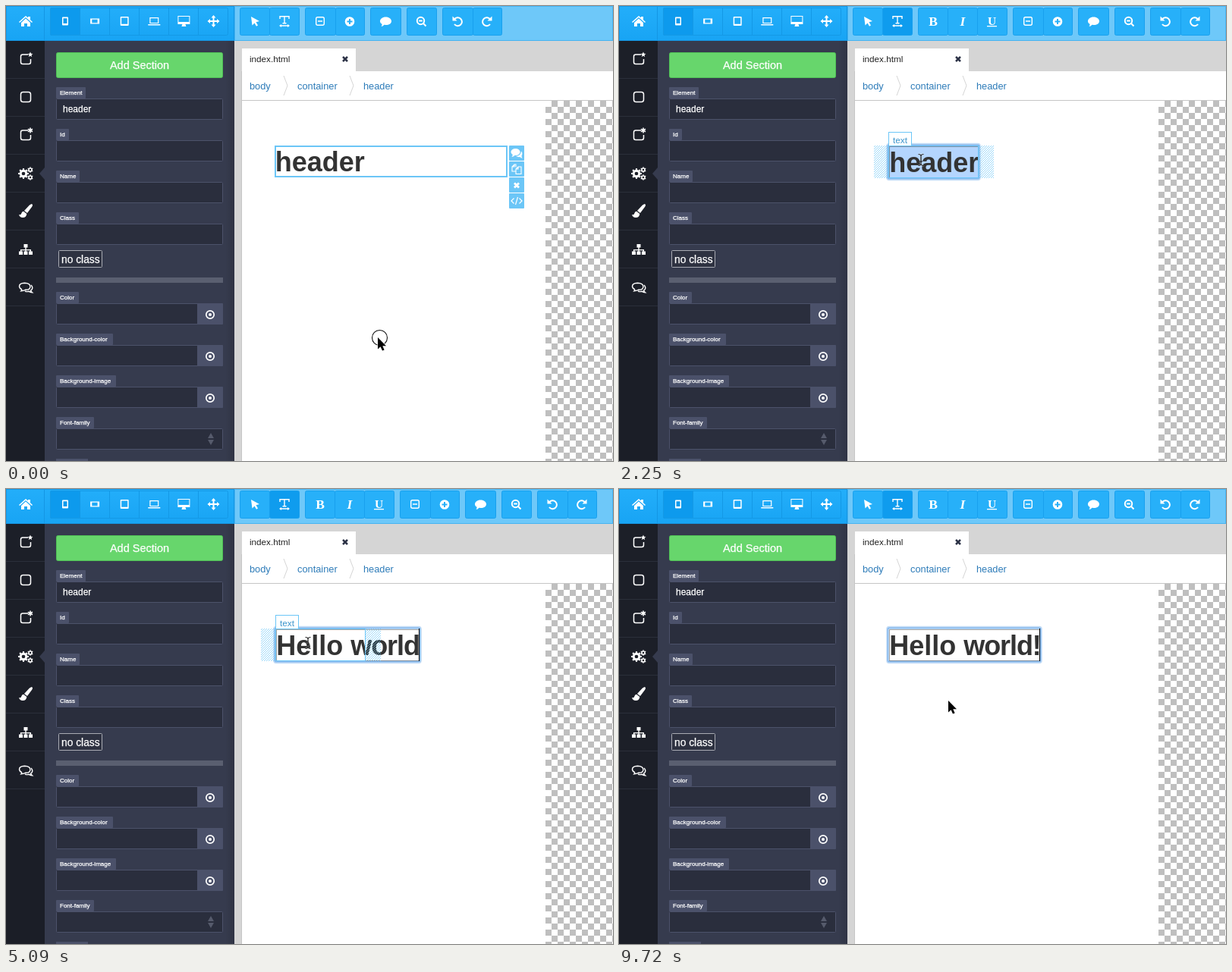
Recreate the animation shown at these times as an HTML page. Size 800 px wide and 600 px high, loop 9.86 s.

```html
<!DOCTYPE html>
<html lang="en">
<head>
<meta charset="utf-8">
<title>Page editor</title>
<style>
html, body { margin: 0; width: 100%; height: 100%; overflow: hidden; background: #fff; }
svg { display: block; width: 800px; height: 600px; }
text { font-family: "Liberation Sans", Arial, sans-serif; white-space: pre; }
.serif { font-family: "Liberation Serif", Times, serif; font-weight: bold; }
</style>
</head>
<body>
<svg id="stage" viewBox="0 0 800 600" xmlns="http://www.w3.org/2000/svg">
<defs>
  <pattern id="hatch" width="3" height="3" patternUnits="userSpaceOnUse">
    <path d="M-1 1L1-1M0 3L3 0M2 4L4 2" stroke="#6cc6f7" stroke-width=".7"/>
  </pattern>
  <pattern id="checker" x="711" y="125" width="16" height="16" patternUnits="userSpaceOnUse">
    <path d="M8 0h8v8H0v8h8z" fill="#bfbfbf"/>
  </pattern>
  <linearGradient id="bar" x2="0" y2="1"><stop stop-color="#23aefa"/><stop offset="1" stop-color="#18a4f4"/></linearGradient>
  <linearGradient id="edge"><stop stop-color="#000" stop-opacity="0"/><stop offset="1" stop-color="#000" stop-opacity=".12"/></linearGradient>
</defs>
<g id="base"></g>
<g id="tools"></g>
<g id="live"></g>
</svg>
<script>
const LOOP = 9860;
const SKY = '#6cc6f7';
const BAR = 46;
const byId = id => document.getElementById(id);

const rect = (x, y, w, h, fill, more = '') =>
  `<rect x="${x}" y="${y}" width="${w}" height="${h}" fill="${fill}" ${more}/>`;
const frame = (x, y, w, h, fill, stroke, r = 1) =>
  rect(x + .5, y + .5, w - 1, h - 1, fill, `stroke="${stroke}" rx="${r}"`);
const text = (x, y, s, size, fill = '#fff', more = '') =>
  `<text x="${x}" y="${y}" font-size="${size}" fill="${fill}" ${more}>${s}</text>`;
const solid = (x, y, d, fill = '#fff', more = '') =>
  `<path transform="translate(${x} ${y})" d="${d}" fill="${fill}" fill-rule="evenodd" ${more}/>`;
const line = (x, y, d, w = 1.5, color = '#fff', more = '') =>
  `<path transform="translate(${x} ${y})" d="${d}" fill="none" stroke="${color}" stroke-width="${w}" ${more}/>`;
const dot = (x, y, r, fill = '#fff', more = '') => `<circle cx="${x}" cy="${y}" r="${r}" fill="${fill}" ${more}/>`;
const STURDY = 'stroke="#fff" stroke-width=".25"';

const ICON = {
  home: 'M-9 0L0-8 3-5.400V-7H6V-2.700L9 0 8 1 0-6-8 1zM-6 1L0-4.500 6 1V6H2V2H-2V6H-6z',
  phone: 'M-3-5.500H3Q4-5.500 4-4.500V4.500Q4 5.500 3 5.500H-3Q-4 5.500-4 4.500V-4.500Q-4-5.500-3-5.500zM-2.500-3.800V3H2.500V-3.800z',
  wide: 'M-6-3.500H6V3.500H-6zM-3.800-2.200V2.200H3.500V-2.200z',
  tablet: 'M-4.500-6H4.500Q5.500-6 5.500-5V5Q5.500 6 4.500 6H-4.500Q-5.500 6-5.500 5V-5Q-5.500-6-4.500-6zM-4-4.500V3.800H4V-4.500z',
  laptop: 'M-6-5H6V3H-6zM-4.800-3.800V2H4.800V-3.800zM-8 4H8V5.500H-8z',
  desktop: 'M-8-7H8V4H2L3 7H-3L-2 4H-8zM-7-6V1H7V-6z',
  move: 'M0-8L3-4.500H1V-1H4.500V-3L8 0 4.500 3V1H1V4.500H3L0 8-3 4.500H-1V1H-4.500V3L-8 0-4.500-3V-1H-1V-4.500H-3z',
  pointer: 'M-5-6L6 0 1.500 1.300 4 5.500 2 6.700-.5 2.500-3.500 5.500z',
  bubble: 'M0-5.500C4.500-5.500 7.500-3 7.500 0S4.500 5 0 5L-2 4.800Q-4 7-6 7-4.500 5-5 3.800C-7 2.700-7.500 1.500-7.500 0-7.500-3-4.500-5.500 0-5.500z',
  undo: 'M-4-2.500A5.500 5.500 0 1 1-4 4',
  star: 'M0-3.500L1-1.200 3.500-1 1.500.6 2.200 3 0 1.700-2.200 3-1.500.6-3.500-1-1-1.200z',
  cross: 'M-3-3L3 3M3-3L-3 3',
  arrow: 'M0 0V15.500L3.600 12.200 6 17.600 8.600 16.500 6.300 11.300H11z',
  beam: 'M-3.500-7.500Q-1-7.500 0-6 1-7.500 3.500-7.500M0-6V6M-3.500 7.500Q-1 7.500 0 6 1 7.500 3.500 7.500M-2 2H2'
};

function group(x, widths, active = -1) {
  let out = '';
  widths.forEach((w, i) => {
    out += frame(x, 2, w + (i < widths.length - 1), 37, i === active ? '#0f9cee' : '#27b0f9', '#18a0ee', 2);
    x += w;
  });
  return out;
}

const speechOutline = (x, y) =>
  line(x, y, 'M-4.500 4.500Q-2 4.500-.5 3.300 6 3.500 6-1 5.500-5.500-1.500-5.700-8.500-5.500-8.500-1-8 1.500-5.500 2.500-5 3.500-6 4.700z', 1.400) +
  line(x, y, 'M7-3Q10 0 8 3L6.500 4Q7 5.500 8.500 6.700 5.500 6.500 4.500 5.300 1 6-1 5', 1.400);

const speechSolid = (x, y) =>
  `<ellipse cx="${x - 1.500}" cy="${y - 1.500}" rx="6" ry="4.500" fill="#fff"/>` +
  solid(x - 4.500, y + 2, 'M0-1L-2 3Q1 2.500 2.500 .5z') +
  solid(x + 2.500, y + 1.500, 'M3.500-4Q6-1.500 4 2 4 4 5 5 3 5 2 3.500-1 4-3.500 2.500 3 2 3.500-4z');

function gear(x, y, r, teeth) {
  const turn = 360 / teeth;
  let out = dot(x, y, r * .63, 'none', `stroke="#fff" stroke-width="${r * .48}"`);
  for (let i = 0; i < teeth; i++)
    out += rect(x - r * .18, y - r * 1.15, r * .36, r * .45, '#fff', `transform="rotate(${i * turn} ${x} ${y})"`);
  return out;
}

function topLeft() {
  let out = frame(0, 0, 301, BAR, 'url(#bar)', '#1595e2', 0) + rect(50, 0, 1, BAR, '#1496e4');
  out += rect(58, 2, 39, 37, '#0d9aed', 'rx="2"') + frame(58, 2, 235, 37, 'none', '#1499e6', 2);
  for (let x = 97; x < 290; x += 39) out += rect(x, 2, 1, 37, '#1499e6');
  out += solid(26, 21, ICON.home);
  ['phone', 'wide', 'tablet', 'laptop', 'desktop', 'move'].forEach((name, i) => {
    out += solid(78 + i * 39.1, 20, ICON[name]);
  });
  return out;
}

function sideNav() {
  let out = rect(0, BAR, 51, 600 - BAR, '#1b1e27') + rect(0, BAR, 51, 349, '#1c1f28');
  for (let y = 95; y < 400; y += 50) out += rect(0, y, 51, 1, '#2b2f3a');
  const open = 'M3-6H-4Q-6.500-6-6.500-3.500V4Q-6.500 6.500-4 6.500H4Q6.500 6.500 6.500 4V0';
  out += line(26, 70, open) + solid(32, 64, ICON.star);
  out += rect(19.500, 113.500, 13, 13, 'none', 'rx="3" stroke="#fff" stroke-width="1.500"');
  out += line(26, 170, open) + line(32, 164, 'M0-3.500V3.500M-3-1.700L3 1.700M3-1.700L-3 1.700', 1.600);
  out += gear(23, 221, 6, 8) + gear(32, 216, 3.300, 6) + gear(32, 226, 3.300, 6);
  out += solid(26, 270, 'M8-9Q10-8 8-5L2 3-2 0 5-7.500Q7-9 8-9zM-3 .7L1.300 4Q1 9-4 9-8 9-9 5-6 6-5.500 3-5 1-3 .7z');
  out += solid(26, 321, 'M-2.500-7H2.500V-2.500H.7V0H7V2.500H9V7H4V2.500H5.600V1.300H.7V2.500H2.500V7H-2.500V2.500H-.7V1.300H-5.600V2.500H-4V7H-9V2.500H-7V0H-.7V-2.500H-2.500z');
  return out + speechOutline(26, 371);
}

function field(y, name, tagWidth, picker) {
  let out = rect(66, y, tagWidth, 15, '#4b516a', 'rx="1"') + text(71, y + 10, name, 8, '#fff', STURDY) +
    frame(66, y + 15, 220, 28, '#2a2e3d', '#4c526a');
  if (picker) {
    out += rect(252, y + 15, 34, 28, '#4b516a', 'rx="1"') +
      dot(269, y + 30, 5.200, 'none', 'stroke="#fff" stroke-width="1.700"') + dot(269, y + 30, 2);
  }
  return out;
}

function panel() {
  let out = rect(51, BAR, 250, 600 - BAR, '#363b4e') + rect(289, BAR, 12, 600 - BAR, 'url(#edge)');
  out += solid(51, 221, 'M0-8L-7 0 0 8z', '#363b4e');
  out += frame(66, 61, 220, 34, '#67d66c', '#50c156', 2) +
    text(176, 83, 'Add Section', 14.500, '#fff', `text-anchor="middle" ${STURDY}`);
  [['Element', 39], ['Id', 17], ['Name', 31], ['Class', 30]].forEach(([name, w], i) => {
    out += field(107 + i * 55, name, w);
  });
  out += text(75, 140, 'header', 12, '#fff', STURDY);
  out += frame(69, 322, 58, 23, '#2e3241', '#a9abb3') + text(73, 339, 'no class', 13.800, '#fff', STURDY);
  out += rect(66, 358, 220, 7, '#5a5f70');
  [['Color', 30], ['Background-color', 75], ['Background-image', 79]].forEach(([name, w], i) => {
    out += field(377 + i * 55, name, w, true);
  });
  out += field(542, 'Font-family', 50) + solid(270, 571, 'M0-8L4-1H-4zM0 8L4 1H-4z', '#565b6c');
  return out + rect(66, 597, 42, 3, '#4b516a');
}

function workspace() {
  let out = rect(301, BAR, 499, 600 - BAR, '#d5d5d5') + rect(310, 86, 490, 514, '#c6c6c6');
  out += rect(311, 56, 150, 31, '#fff') + rect(311, 86, 489, 38, '#fff') + rect(311, 125, 489, 475, '#fff');
  out += rect(711, 125, 89, 475, 'url(#checker)');
  out += text(321, 74, 'index.html', 11.700, '#222') + line(447, 70, ICON.cross, 2.500, '#2d3347');
  [[321, 'body'], [384, 'container'], [471, 'header']].forEach(([x, s]) => {
    out += text(x, 110, s, 12.800, '#2e7cb9');
  });
  const chevron = 'M0-13L5 0 0 13';
  return out + line(366, 105, chevron, 1, '#d5d5d5') + line(453, 105, chevron, 1, '#d5d5d5');
}

function toolbar(textTool, formatting) {
  let out = frame(301, 0, 499, BAR, '#6ec8f9', '#45b4f2', 0);
  out += group(308, [39, 40], textTool ? 1 : -1) + solid(328, 20, ICON.pointer);
  out += line(367, 20, 'M-6-3V-6.200H6V-3M0-6V3M-2.500 2.700H2.500M-6 6H6', 1.400) +
    solid(367, 20, 'M-7 6L-4 4V8zM7 6L4 4V8z');
  if (formatting) {
    out += group(394, [39, 39, 40]);
    [['B', 414, ''], ['I', 453, 'font-style="italic"']].forEach(([s, x, style]) => {
      out += text(x, 26, s, 17.500, '#fff', `class="serif" text-anchor="middle" ${style}`);
    });
    out += text(491.500, 24.500, 'U', 15.500, '#fff', 'class="serif" text-anchor="middle"') + rect(485, 26, 13, 1.300, '#fff');
  }
  const redo = line(0, 0, ICON.undo, 2) + solid(0, 0, 'M-6.500-6.500V-.5H-.5z');
  const rest = group(394, [40, 39]) + group(480, [41]) + group(528, [40]) + group(575, [40, 39]) +
    rect(408.700, 14.700, 10.600, 10.600, 'none', 'rx="2" stroke="#fff" stroke-width="1.400"') +
    line(414, 20, 'M-3 0H3', 1.500) +
    dot(453, 20.500, 6.300) + line(453, 20.500, 'M-3.500 0H3.500M0-3.500V3.500', 2, '#27b0f9') +
    solid(500.500, 20, ICON.bubble) +
    dot(546.500, 19.500, 4.700, 'none', 'stroke="#fff" stroke-width="2"') +
    line(546.500, 19.500, 'M-2.300 0H2.300M3.500 3.500L7 7', 2) +
    `<g transform="translate(595 20)">${redo}</g><g transform="translate(634 20) scale(-1 1)">${redo}</g>`;
  return out + `<g transform="translate(${formatting ? 125 : 0})">${rest}</g>`;
}

const hatch = (x, y, w, h) => rect(x, y, w, h, 'url(#hatch)');
const tag = (s, w) => frame(355, 166, w, 19, '#fff', SKY, 0) + text(361, 181, s, 11.800, '#3a94cb');

function selectedHeader() {
  let out = text(354.800, 218, 'header', 36, '#333', 'font-weight="bold"') +
    rect(355, 185, 305, 40, 'none', `stroke="${SKY}" stroke-width="2"`);
  for (let i = 0; i < 4; i++) out += rect(663, 184 + i * 21, 20, 20, SKY, 'rx="1"');
  out += speechSolid(673, 194);
  out += line(673, 215, 'M-1-2.500V-6H-3L-6-3V3H-1M-3-6V-3H-6M-1 6.500V0L2-3H6V6.500zM2-3V0H-1', 1.100);
  out += line(673, 236.500, ICON.cross, 2.800);
  return out + line(673, 257, 'M-3.500-3.500L-7 0-3.500 3.500M3.500-3.500L7 0 3.500 3.500M1.500-5L-1.500 5', 1.200);
}

const hover = {
  header: () => hatch(355, 165, 305, 19) + hatch(355, 227, 305, 17) + tag('header', 48),
  container: () => hatch(340, 165, 15, 79) + hatch(660, 165, 15, 79) + tag('container', 63),
  text: right => hatch(336, 184, 19, 43) + hatch(right, 184, 20, 43) +
    frame(355, 184, right - 355, 43, 'none', SKY, 0) + tag('text', 31)
};

const pen = document.createElement('canvas').getContext('2d');
pen.font = 'bold 36px "Liberation Sans", Arial, sans-serif';
const TIGHT = -1.1;
const textLeft = 356.3;

function editor(s, selected, caret, overlay) {
  const first = s.slice(0, 6), second = s.slice(6);
  const split = textLeft + pen.measureText(first).width;
  const right = Math.round(split + pen.measureText(second).width + TIGHT * second.length - .3);
  const w = right - 355;
  const style = 'font-weight="bold"';
  return rect(354, 182.500, w + 2, 46, '#fff', 'rx="2" stroke="#c3dcf6" stroke-width="3.500"') +
    rect(354.500, 183.500, w + 1, 44, selected ? '#b4d5fe' : '#fff', 'rx="1" stroke="#86b9ee" stroke-width="2"') +
    rect(356.500, 185.500, w - 2, 41, 'none', 'stroke="#444" stroke-dasharray="1 1"') +
    text(textLeft, 219, first, 36, '#333', style) +
    text(split, 219, second, 36, '#333', `${style} letter-spacing="${TIGHT}"`) +
    overlay + (caret ? rect(right - 1, 184, 1, 43, '#000') : '');
}

// Mouse: start time, x, y, shape
const moves = [
  [0, 490, 437, 'click'], [150, 490, 437, 'arrow'], [600, 466, 380, 'arrow'], [750, 418, 272, 'arrow'],
  [900, 392, 202, 'arrow'], [1050, 380, 172, 'arrow'], [1200, 367, 62, 'arrow'], [1350, 364, 22, 'click'],
  [1500, 364, 22, 'arrow'], [1800, 374, 80, 'arrow'], [1950, 392, 160, 'arrow'], [2100, 398, 203, 'beam'],
  [6430, 453, 198, 'beam'], [6580, 443, 256, 'arrow'], [6720, 434, 279, 'arrow']
];
const keyTimes = [3000, 3300, 3450, 3590, 3740, 4040, 4490, 4640, 4790, 4940, 5090, 5690];
const blinkTimes = [6130, 6720, 7320, 7770, 8220, 8820, 9270, 9720];
const passed = (times, t) => times.filter(at => at <= t).length;

function mouse(t) {
  const [, x, y, shape] = moves[passed(moves.map(m => m[0]), t) - 1];
  if (shape === 'beam')
    return line(x, y, ICON.beam, 2.400, '#fff', 'stroke-opacity=".4"') + line(x, y, ICON.beam, 1.200, '#111');
  return (shape === 'click' ? dot(x + 2.500, y + .5, 10, 'none', 'stroke="#111" stroke-width="1.100"') : '') +
    solid(x, y, ICON.arrow, '#000', 'stroke="#fff" stroke-width="1.100" paint-order="stroke"');
}

function page(t) {
  if (t < 2250) {
    const over = t < 900 ? '' : t < 1050 ? 'header' : t < 1200 ? 'container' : t < 2100 ? '' : 'text';
    return selectedHeader() + (over ? hover[over](474) : '');
  }
  const typed = passed(keyTimes, t);
  const caret = typed > 0 && passed(blinkTimes, t) % 2 === 0;
  const overlay = t < 6430 ? hover.text(474) : t < 6580 ? hover.text(555) : '';
  return editor(typed ? 'Hello world!'.slice(0, typed) : 'header', !typed, caret, overlay);
}

function put(id, markup) {
  const node = byId(id);
  if (node.markup !== markup) node.innerHTML = node.markup = markup;
}

function render(t) {
  put('tools', toolbar(t >= 1350, t >= 2250));
  put('live', page(t) + mouse(t));
}

put('base', topLeft() + sideNav() + panel() + workspace());
const start = performance.now();
function tick() {
  render((performance.now() - start) % LOOP);
  requestAnimationFrame(tick);
}
tick();
</script>
</body>
</html>
```
